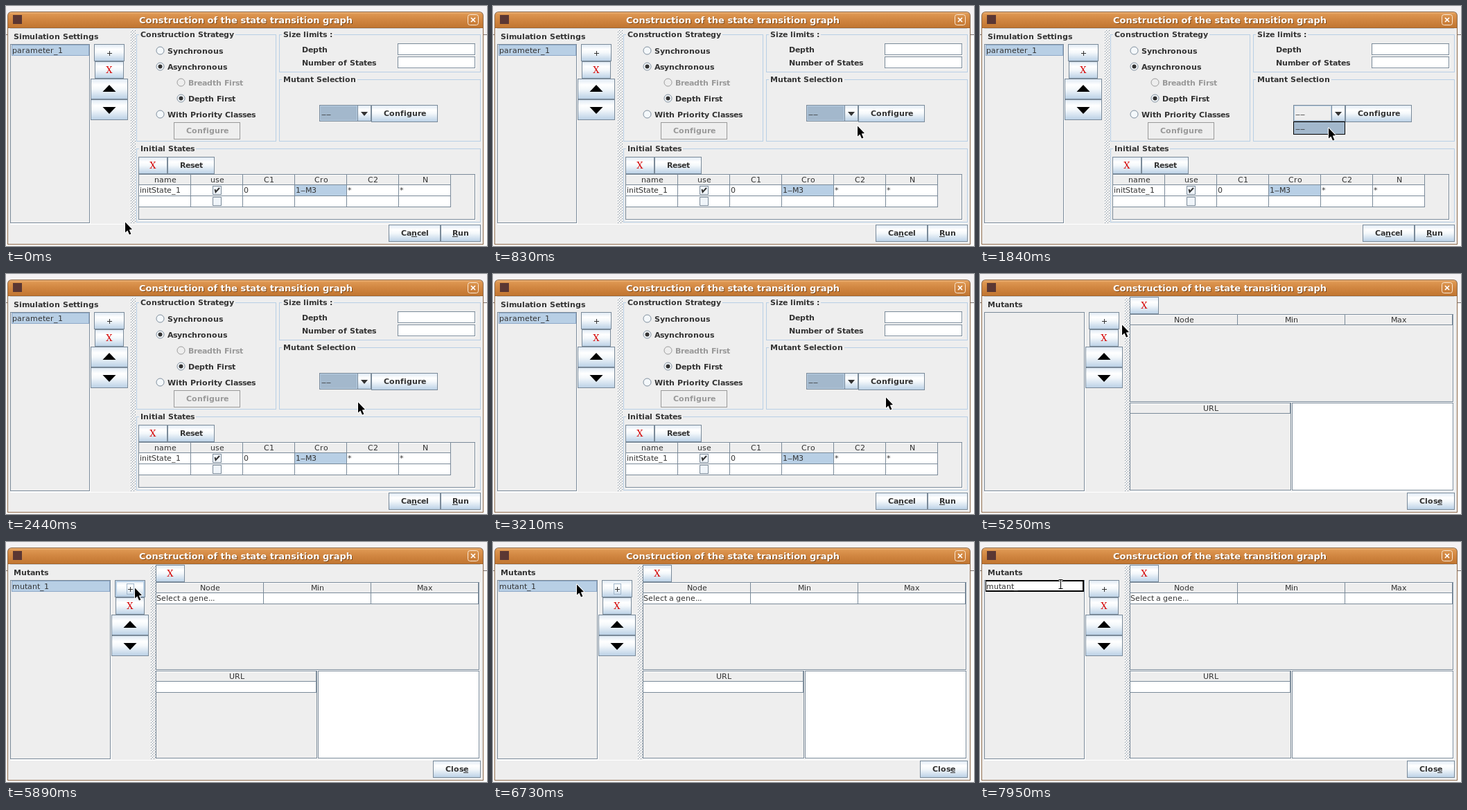
These frames come from a looping animation (694 by 347 pixels, 8000 ms). An HTML page with a canvas:

```html
<!DOCTYPE html>
<html lang="en">
<head>
<meta charset="utf-8">
<title>State transition graph dialog</title>
<style>
html, body { margin: 0; width: 100%; height: 100%; overflow: hidden; background: #fff; }
canvas { display: block; }
</style>
</head>
<body>
<canvas id="stage" width="694" height="347"></canvas>
<script>
const ctx = document.getElementById('stage').getContext('2d');
const LOOP = 8000, STEP = 40;
const EDGE = '#7a8a99', PALE = '#b8cfe5', FOCUS = '#a3b8cc', FACE = '#eeeeee', INK = '#333333', GREY = '#999999';
const SANS = '"DejaVu Sans", sans-serif';
const DASH = '\u2012';

// Pointer moves: start, end, then [progress, x, y] stops.
const moves = [
  [150, 950, [[0, 172, 312], [0.7, 559, 195], [0.88, 524, 172], [1, 519, 155]]],
  [990, 990, [[0, 519, 155], [1, 517, 154]]],
  [1560, 2360, [[0, 517, 154], [0.38, 503, 176], [1, 508, 185]]],
  [2610, 3530, [[0, 508, 185], [0.667, 567, 178], [0.87, 574, 159], [1, 571, 154]]],
  [4610, 5650, [[0, 571, 154], [0.63, 205, 73], [0.78, 198, 69], [1, 186, 66]]],
  [6370, 6810, [[0, 186, 66], [1, 116, 61]]]
];

let pointer = [0, 0];
const widths = new Map();

function pointerAt(t) {
  const move = moves.filter(m => t >= m[0]).pop();
  if (!move) return [172, 312];
  const [start, end, stops] = move;
  const p = Math.min(1, (Math.floor((t - start) / STEP) + 1) / ((end - start) / STEP + 1));
  const i = Math.max(1, stops.findIndex(s => s[0] >= p));
  const [u0, x0, y0] = stops[i - 1], [u1, x1, y1] = stops[i];
  const u = (p - u0) / (u1 - u0), e = u * u * (3 - 2 * u);
  return [Math.round(x0 + (x1 - x0) * e), Math.round(y0 + (y1 - y0) * e)];
}

function fill(x, y, w, h, color) {
  ctx.fillStyle = color;
  ctx.fillRect(x, y, w, h);
}

function frame(x, y, w, h, color = EDGE) {
  ctx.strokeStyle = color;
  ctx.lineWidth = 1;
  ctx.strokeRect(x + 0.5, y + 0.5, w - 1, h - 1);
}

function box(x, y, w, h, color, edge = EDGE) {
  fill(x, y, w, h, color);
  frame(x, y, w, h, edge);
}

function shape(points, color) {
  ctx.beginPath();
  points.forEach(([x, y]) => ctx.lineTo(x, y));
  ctx.closePath();
  ctx.fillStyle = color;
  ctx.fill();
}

// Glyph advances are whole pixels, as in the dialog's toolkit.
function advance(ch, bold) {
  const key = ch + bold;
  if (!widths.has(key)) {
    ctx.font = `${bold ? 'bold ' : ''}110px ${SANS}`;
    const w = ctx.measureText(ch).width / 10;
    widths.set(key, Math.round(bold ? w - 0.05 : w));
  }
  return widths.get(key);
}

function text(str, x, y, { bold = false, color = INK, center = false, mnemonic = -1 } = {}) {
  const steps = [...str].map(ch => advance(ch, bold));
  if (center) x = Math.round(x - steps.reduce((a, b) => a + b, 0) / 2);
  ctx.font = `${bold ? 'bold ' : ''}11px ${SANS}`;
  ctx.fillStyle = color;
  [...str].forEach((ch, i) => {
    ctx.fillText(ch, x, y);
    if (i === mnemonic) ctx.fillRect(x, y + 1, steps[i], 1);
    x += steps[i];
  });
}

const label = (str, x, y, options) => text(str, x, y, { bold: true, ...options });

function button(x, y, w, h, { pressed = false, disabled = false } = {}) {
  const g = ctx.createLinearGradient(0, y, 0, y + h);
  g.addColorStop(0, '#dde8f3');
  g.addColorStop(0.3, '#ffffff');
  g.addColorStop(0.5, '#f4f8fb');
  g.addColorStop(1, PALE);
  box(x, y, w, h, disabled ? FACE : pressed ? PALE : g, disabled ? GREY : EDGE);
  const over = pointer[0] >= x && pointer[0] < x + w && pointer[1] >= y && pointer[1] < y + h;
  if (over && !disabled && !pressed) {
    frame(x + 1, y + 1, w - 2, h - 2, PALE);
    frame(x + 2, y + 2, w - 4, h - 4, PALE);
  }
}

function textButton(str, x, y, w, h, options = {}) {
  button(x, y, w, h, options);
  label(str, x + w / 2, y + h / 2 + 4 | 0, {
    center: true, color: options.disabled ? GREY : INK, mnemonic: options.mnemonic
  });
}

function crossButton(x, y, w, h) {
  button(x, y, w, h);
  ctx.font = '13px "DejaVu Serif", serif';
  ctx.fillStyle = '#d40000';
  ctx.textAlign = 'center';
  ctx.fillText('X', x + w / 2, y + h / 2 + 5 | 0);
  ctx.textAlign = 'left';
}

function plusButton(x, y, w, h, focused) {
  button(x, y, w, h);
  const cx = x + (w >> 1), cy = y + 13;
  fill(cx - 3, cy, 7, 1, INK);
  fill(cx, cy - 3, 1, 7, INK);
  if (focused) frame(cx - 5, cy - 8, 11, 16, FOCUS);
}

function orderButtons(x) {
  const c = x + 27;
  button(x, 105, 54, 30);
  shape([[c - 9.5, 124], [c, 114], [c + 9.5, 124]], '#000');
  button(x, 135, 54, 30);
  shape([[c - 9.5, 146], [c + 9.5, 146], [c, 156]], '#000');
}

function group(title, x, y, w, h) {
  frame(x, y, w, h, PALE);
  fill(x + 4, y, [...title].reduce((s, ch) => s + advance(ch, true), 4), 1, FACE);
  label(title, x + 6, y + 4);
}

function radio(str, x, y, selected, disabled) {
  const cx = x + 0.5, cy = y + 0.5;
  ctx.beginPath();
  ctx.arc(cx, cy, 5.5, 0, 7);
  ctx.fillStyle = disabled ? FACE : '#f4f8fb';
  ctx.fill();
  ctx.lineWidth = 1;
  ctx.strokeStyle = disabled ? GREY : EDGE;
  ctx.stroke();
  if (selected) {
    ctx.beginPath();
    ctx.arc(cx, cy, 3, 0, 7);
    ctx.fillStyle = INK;
    ctx.fill();
  }
  label(str, x + 11, y + 5, { color: disabled ? GREY : INK });
}

function checkbox(x, y, checked) {
  box(x, y, 13, 13, '#f0f5fa');
  if (!checked) return;
  ctx.beginPath();
  ctx.moveTo(x + 3.5, y + 5);
  ctx.lineTo(x + 4.5, y + 9);
  ctx.lineTo(x + 10, y + 3);
  ctx.lineWidth = 2;
  ctx.strokeStyle = INK;
  ctx.stroke();
}

// A sunken pane: dark outline with a white edge below and to the right.
function pane(x, y, w, h, color = FACE) {
  fill(x + 1, y + 1, w, h, '#fff');
  box(x, y, w, h, color);
}

function header(names, x, y, w) {
  names.forEach((name, i) => {
    box(x + i * w - 1, y - 1, w + 1, 16, FACE);
    fill(x + i * w, y, w - 1, 1, '#fff');
    text(name, x + i * w + w / 2, y + 11, { center: true });
  });
}

function row(x, y, w, count) {
  for (let i = 0; i < count; i++) box(x + i * w - 1, y - 1, w + 1, 17, '#fff');
}

function divider(x) {
  for (let y = 34; y < 313; y += 2) {
    for (let i = (y / 2) % 2; i < 4; i += 2) {
      fill(x + i * 2, y, 1, 1, '#fff');
      fill(x + 1 + i * 2, y + 1, 1, 1, EDGE);
    }
  }
}

function selectedRow(str, w, edge) {
  box(8, 56, w, 16, PALE, edge);
  text(str, 9, 68);
}

function windowFrame() {
  fill(0, 0, 694, 347, '#ffffff');
  fill(0, 0, 694, 41, '#f4f2f4');
  fill(0, 41, 694, 1, '#77706f');
  ctx.beginPath();
  ctx.roundRect(2, 8, 687, 337, [6, 6, 0, 0]);
  ctx.fillStyle = '#8d6a4b';
  ctx.fill();
  const g = ctx.createLinearGradient(0, 9, 0, 32);
  g.addColorStop(0, '#eeb57c');
  g.addColorStop(0.12, '#dd9650');
  g.addColorStop(0.5, '#d08540');
  g.addColorStop(1, '#c07530');
  ctx.beginPath();
  ctx.roundRect(3, 9, 685, 23, [5, 5, 0, 0]);
  ctx.fillStyle = g;
  ctx.fill();
  fill(3, 31, 685, 1, '#a5642a');
  fill(3, 32, 685, 312, FACE);
  fill(10, 13, 13, 13, '#5b3733');

  ctx.font = `bold 13px ${SANS}`;
  ctx.textAlign = 'center';
  ['#7f4a1a', '#ffffff'].forEach((color, i) => {
    ctx.fillStyle = color;
    ctx.fillText('Construction of the state transition graph', 347 - i, 26 - i);
  });
  ctx.textAlign = 'left';

  ctx.beginPath();
  ctx.roundRect(666.5, 12.5, 15, 15, 3);
  ctx.lineWidth = 1;
  ctx.strokeStyle = '#fbe9d6';
  ctx.stroke();
  ctx.beginPath();
  ctx.moveTo(671, 17);
  ctx.lineTo(677, 23);
  ctx.moveTo(677, 17);
  ctx.lineTo(671, 23);
  ctx.lineWidth = 1.7;
  ctx.strokeStyle = '#fff';
  ctx.stroke();
  fill(6, 32, 678, 1, '#c9d0d7');
  fill(6, 315, 678, 1, '#fff');
}

function mutantCombo(t) {
  const open = t >= 1110 && t < 2440;
  const focused = !open && t < 3890;
  box(452, 143, 75, 24, FACE);
  frame(453, 144, 54, 22, PALE);
  if (focused) fill(454, 145, 52, 20, FOCUS);
  text(DASH + DASH, 455, 160);
  button(507, 143, 20, 24, { pressed: t >= 1110 && t < 1270 });
  shape([[512, 153], [522, 153], [517, 159]], INK);
  const clicked = t >= 3890;
  textButton('Configure', 527, 143, 96, 25, { pressed: clicked });
  if (clicked) frame(542, 148, 66, 15, FOCUS);
  if (open) {
    box(452, 167, 75, 19, FOCUS, '#000');
    text(DASH + DASH, 455, 181);
  }
}

function settingsPanel(t) {
  label('Simulation Settings', 11, 48);
  pane(6, 55, 115, 259);
  selectedRow('parameter_1', 112, '#8fa9c9');
  plusButton(127, 55, 44, 25);
  crossButton(128, 80, 42, 25);
  orderButtons(122);
  divider(179);

  group('Construction Strategy', 188, 41, 202, 155);
  radio('Synchronous', 222, 64);
  radio('Asynchronous', 222, 87, true);
  radio('Breadth First', 252, 110, false, true);
  radio('Depth First', 252, 133, true);
  radio('With Priority Classes', 222, 156);
  textButton('Configure', 242, 168, 96, 25, { disabled: true });

  group('Size limits :', 394, 41, 291, 55);
  label('Depth', 427, 67);
  label('Number of States', 427, 86);
  pane(565, 54, 112, 17, '#fff');
  pane(565, 73, 112, 17, '#fff');

  group('Mutant Selection', 394, 106, 291, 90);
  mutantCombo(t);

  group('Initial States', 188, 206, 497, 107);
  crossButton(191, 218, 42, 25);
  textButton('Reset', 233, 218, 68, 25);
  pane(191, 243, 486, 66);
  header(['name', 'use', 'C1', 'Cro', 'C2', 'N'], 192, 244, 75);
  row(192, 259, 75, 6);
  row(192, 275, 75, 6);
  fill(417, 259, 74, 15, PALE);
  ['initState_1', '', '0', `1${DASH}M3`, '*', '*'].forEach((s, i) => text(s, 193 + i * 75, 270));
  checkbox(298, 260, true);
  checkbox(298, 276, false);
}

function mutantsPanel(t) {
  const added = t >= 5890;
  label('Mutants', 11, 48);
  pane(6, 55, 145, 259);
  if (t >= 7950) {
    fill(8, 55, 142, 17, '#000');
    fill(9, 57, 139, 13, '#fff');
    text('mutant_', 9, 68);
  } else if (added) {
    selectedRow('mutant_1', 142, t >= 6850 ? '#6382bf' : '#8fa9c9');
  }
  plusButton(157, 55, 44, 25, added && t < 6850);
  crossButton(158, 80, 42, 25);
  orderButtons(152);
  divider(208);
  crossButton(216, 33, 42, 25);

  pane(216, 58, 467, 127);
  header(['Node', 'Min', 'Max'], 217, 59, 155);
  pane(216, 186, 233, 127);
  header(['URL'], 217, 187, 231);
  pane(450, 186, 233, 127, '#fff');
  if (added) {
    row(217, 74, 155, 3);
    text('Select a gene...', 217, 85);
    row(217, 202, 231, 1);
  }
}

function arrow([x, y]) {
  ctx.save();
  ctx.translate(x, y + 0.5);
  ctx.beginPath();
  [[0, 0], [0, 15], [3.4, 12], [6, 18], [8.4, 17], [5.8, 11], [10, 10.6]]
    .forEach(([px, py]) => ctx.lineTo(px, py));
  ctx.closePath();
  ctx.lineJoin = 'round';
  ctx.lineWidth = 2;
  ctx.strokeStyle = '#fff';
  ctx.stroke();
  ctx.fillStyle = '#000';
  ctx.fill();
  ctx.restore();
}

function textCursor(x, y) {
  [['#fff', 3], ['#000', 1]].forEach(([color, width]) => {
    ctx.beginPath();
    ctx.moveTo(x - 2.5, y - 6.5);
    ctx.lineTo(x + 3.5, y - 6.5);
    ctx.moveTo(x + 0.5, y - 6.5);
    ctx.lineTo(x + 0.5, y + 6.5);
    ctx.moveTo(x - 2.5, y + 6.5);
    ctx.lineTo(x + 3.5, y + 6.5);
    ctx.lineWidth = width;
    ctx.strokeStyle = color;
    ctx.stroke();
  });
}

function draw(now) {
  const t = now % LOOP;
  pointer = pointerAt(t);
  windowFrame();
  if (t < 4130) settingsPanel(t);
  else mutantsPanel(t);

  if (t < 4230) {
    textButton('Cancel', 552, 316, 75, 25, { mnemonic: 2 });
    textButton('Run', 627, 316, 58, 25, { mnemonic: 0 });
  } else {
    textButton('Close', 616, 316, 69, 25, { mnemonic: 4 });
  }

  if (t >= 7950) textCursor(116, 61);
  else arrow(pointer);
  requestAnimationFrame(draw);
}

requestAnimationFrame(draw);
</script>
</body>
</html>
```
